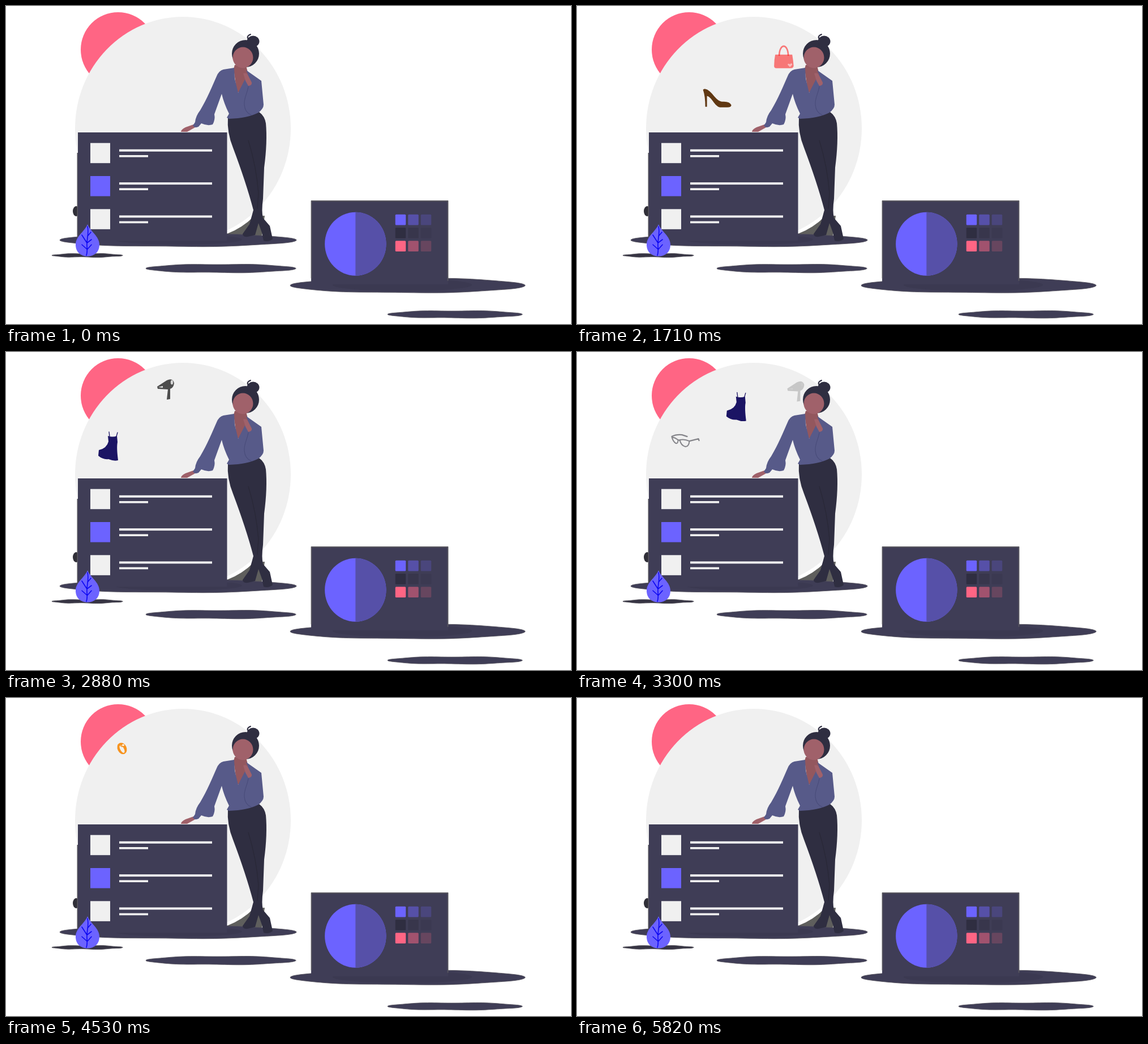
An HTML page with a canvas for the animation above (6.3 s loop, 998 by 561 pixels).

```html
<!DOCTYPE html>
<html lang="en">
<head>
<meta charset="utf-8">
<style>
html, body { margin: 0; width: 100%; height: 100%; overflow: hidden; background: #fff; }
canvas { display: block; width: 998px; height: 561px; }
</style>
</head>
<body>
<canvas id="stage" width="998" height="561"></canvas>
<script>
const ctx = document.getElementById('stage').getContext('2d');
const LOOP = 6300, STEP = 30, FADE = 240, PANEL_TOP = 223;
const SLATE = '#3f3d56', DARK = '#2f2e41', VIOLET = '#6c63ff', SKIN = '#a0616a',
      SHIRT = '#575a89', PALE = '#f0f0f0', PINK = '#ff6584', EDGE = '#58565f';

function fill(color, d) {
  ctx.fillStyle = color;
  ctx.fill(new Path2D(d), 'evenodd');
}
function line(color, width, d) {
  ctx.strokeStyle = color;
  ctx.lineWidth = width;
  ctx.lineCap = ctx.lineJoin = 'round';
  ctx.stroke(new Path2D(d));
}
function rect(color, x, y, w, h) {
  ctx.fillStyle = color;
  ctx.fillRect(x, y, w, h);
}
function oval(color, x, y, rx, ry = rx, tilt = 0, from = 0, to = 7) {
  ctx.fillStyle = color;
  ctx.beginPath();
  ctx.ellipse(x, y, rx, ry, tilt, from, Math.min(to, from + 2 * Math.PI));
  ctx.fill();
}

// Ground shadow with a slightly ragged rim.
function shadow(x0, x1, y, ry, color = SLATE) {
  const cx = (x0 + x1) / 2, rx = (x1 - x0) / 2;
  ctx.beginPath();
  for (let i = 0; i < 120; i++) {
    const a = i / 120 * 2 * Math.PI;
    const rough = Math.sin(i * 12.9) * 0.6;
    ctx.lineTo(cx + rx * Math.cos(a), y + (ry + rough) * Math.sin(a));
  }
  ctx.closePath();
  ctx.fillStyle = color;
  ctx.fill();
  ctx.strokeStyle = EDGE;
  ctx.lineWidth = 0.8;
  ctx.stroke();
}

function drawBackdrop() {
  rect('#fff', 0, 0, 998, 561);
  oval(PINK, 198, 77, 66);
  oval(PALE, 312.5, 216, 190.5, 197);
  fill('#5f5f5d', 'M390 402Q417 392 438 371L457 370L452 405H390Z');
}

function drawListPanel() {
  oval('#302f38', 124, 362, 6, 9);
  rect(EDGE, 125.5, 259, 2, 150);
  shadow(95, 513, 413, 11.5);
  oval('#3b3951', 304, 412, 113, 9);
  rect(SLATE, 127, 223, 263.5, 191);
  for (let i = 0; i < 3; i++) {
    const y = i * 58.3;
    rect(i === 1 ? VIOLET : PALE, 149, 241.7 + y, 35, 35.5);
    rect(PALE, 200, 252.8 + y, 164, 4);
    rect(PALE, 200, 263 + y, 51, 3.7);
  }
}

function drawLeaf() {
  shadow(81, 206, 440, 3.2, '#363443');
  fill(VIOLET, 'M144 385C149 398 165 406 165 421C165 434 156 441.5 144 441.5S123 434 123 421C123 406 139 398 144 385Z');
  line('#0d08f2', 1.6, 'M144 389C147 400 142 413 143 424Q144 433 142 440M144 406L150 399M143 418L134 404M143 418L151 412M143 429L134 421M143 430L151 421');
}

function drawWoman() {
  fill(DARK, 'M392 196Q390 223 401 250Q424 311 437 360L430 385L418 402Q418 408 427 407L440 404L446 383L452 400L455 414Q464 417 471 411L466 388L454 374Q451 362 454 340L456 285Q462 240 459 207Q457 194 447 187Z');
  line('#292837', 1.2, 'M428 237Q442 282 446 330L444 357');
  fill(SKIN, 'M334 208L317 214Q309 218 309 222H320L336 213Z');
  oval(DARK, 423, 84, 24);
  oval(DARK, 436.5, 62.5, 11, 10);
  line(DARK, 2, 'M429 59Q423 54 432 50');
  fill('#93575e', 'M404 104L402 111L408 153L414 151L429 125L424 105Z');
  oval(SKIN, 418.5, 91, 18, 18.5);
  fill(SHIRT, 'M403 109L384 112Q376 114 372 124C365 140 355 164 343 184Q335 194 334 205L330 211Q333 216 340 213L345 207Q356 212 365 209Q370 200 368 191L381 155Q385 172 394 190L390 197L394 199Q427 198 446 188Q455 181 455 174L451 132L424 113L427 120L410 153L404 128Z');
  fill(SKIN, 'M419 119Q424 117 427 121L434 135Q435 140 428 141L423 132Z');
  line('#4a4d7b', 1.2, 'M428 142C427 152 420 162 421 174Q422 188 433 192');
}

function drawPalettePanel() {
  shadow(502, 917, 493, 13);
  oval('#3b3951', 700, 492, 123, 11);
  rect(SLATE, 539, 343, 242, 148);
  line(EDGE, 1.8, 'M539.5 480V344H780.5V484');
  oval(VIOLET, 617.3, 419.7, 54.2, 56);
  oval('#5650a8', 617.3, 419.7, 54.2, 56, 0, -Math.PI / 2, Math.PI / 2);
  const swatches = ['#6c63ff', '#5650a8', '#4a467c', '#2f2e41', '#38364c', '#3b3951', '#ff6584', '#a1526e', '#67465f'];
  swatches.forEach((color, i) => {
    ctx.fillStyle = color;
    ctx.beginPath();
    ctx.roundRect(687.7 + i % 3 * 22.5, 367.8 + Math.floor(i / 3) * 23.2, 18.5, 18.7, 1.5);
    ctx.fill();
  });
}

// Each article is drawn around its own centre.
function sunglasses() {
  const c = '#ed1e79';
  fill(c, 'M-25 -7Q-18 -7 -12 -2L7 -1Q8 8 3 11Q-8 14 -11 3L-13 2Q-12 8 -17 8Q-24 5 -25 -7Z');
  line(c, 2.6, 'M-23 -7Q-18 -11 -7 -10L3 -6M5 1L23 -4L24 -1');
}
function bag() {
  const c = '#ff0000';
  fill(c, 'M-15 -4H15Q17 7 17.5 16Q17 20 12 20H-13Q-17 20 -17 16Q-17 5 -15 -4Z');
  line(c, 2.6, 'M-8 -3C-7 -24 7 -24 8 -3');
  fill('#fff', 'M11 18L7 14Q7 11 11 13Q15 10 15 14Z');
}
function shoe() {
  fill('#603813', 'M-25 -15Q-23 -18 -17 -15C-6 -8 -2 5 9 6Q22 5 25 12Q25 16 18 16H5C-5 14 -9 -2 -18 -4L-18 15H-21Q-21 -4 -25 -15Z');
}
function dryer() {
  const c = '#4d4d4d';
  fill(c, 'M-15 -5L2 -16Q13 -21 15 -11Q14 -3 8 -1L8 17L2 18L4 0L-14 -1Z');
  fill(PALE, 'M-13 -4L-5 -6L-5 -3Z');
  oval('#d7d7d7', 11, -12.5, 2.2, 4);
}
function dress() {
  const c = '#1b1464';
  fill(c, 'M-1 -18Q7 -15 15 -18L16 -7Q14 2 17 25Q10 27 0 23Q-10 24 -18 17L-17 7Q-3 4 0 -8Z');
  line(c, 1.3, 'M1 -25L2 -17M16 -24L14 -17');
}
function glasses() {
  const c = '#85858a';
  line(c, 2, 'M-24 -6Q-18 -5 -13 -1Q-13 6 -17 5Q-22 2 -24 -6ZM-10 -1Q-2 -3 7 1Q6 11 0 11Q-8 9 -10 -1ZM-13 -1L-10 0');
  line(c, 2.3, 'M-24 -7Q-17 -11 -6 -10L3 -7M7 1L23 -3L24 0');
}
function ring() {
  oval('#f7931e', 0, 0, 8, 10.5, -0.45);
  oval(PALE, 0, 1, 3.2, 7.5, -0.5);
  line('#f7931e', 1.4, 'M-5 -6L0 -3L4 -6');
  oval('#fff', 2, -6, 2, 1.6);
}

// Flight points: time, x, y.
const flights = [
  [sunglasses, [[120, 170, 238], [480, 196, 148], [780, 264, 85], [1050, 337, 82], [1340, 415, 89]]],
  [bag, [[720, 222, 246], [1050, 237, 134], [1440, 307, 57], [1540, 334, 54], [1830, 386, 118]]],
  [shoe, [[1410, 235, 242], [1740, 250, 156], [1980, 285, 116], [2280, 335, 151], [2460, 379, 188]]],
  [dryer, [[2070, 201, 245], [2280, 209, 187], [2580, 233, 113], [2880, 282, 66], [3090, 338, 50], [3360, 400, 76]]],
  [dress, [[2580, 168, 251], [2880, 181, 166], [3240, 266, 100], [3510, 340, 106], [3690, 384, 138], [3750, 396, 150]]],
  [glasses, [[3030, 178, 238], [3360, 197, 140], [3690, 249, 71], [3870, 297, 66], [4140, 347, 96]]],
  [ring, [[3960, 157, 235], [4200, 160, 168], [4530, 205, 89], [4740, 254, 99], [5160, 315, 213]]],
  [ring, [[4770, 254, 235], [5070, 256, 155], [5400, 271, 86], [5610, 340, 62], [5820, 409, 85]]]
];

// Cubic Hermite through unevenly timed points.
function locate(points, t) {
  let i = 0;
  while (i < points.length - 2 && t >= points[i + 1][0]) i++;
  const a = points[i], b = points[i + 1], span = b[0] - a[0];
  const slope = (n, k) => {
    const p = points[Math.max(n - 1, 0)], q = points[Math.min(n + 1, points.length - 1)];
    return (q[k] - p[k]) / (q[0] - p[0]);
  };
  const u = (t - a[0]) / span, v = 1 - u;
  return [1, 2].map(k =>
    a[k] * v * v * (1 + 2 * u) + b[k] * u * u * (3 - 2 * u) +
    span * u * v * (v * slope(i, k) - u * slope(i + 1, k)));
}

function drawFlights(t) {
  ctx.save();
  ctx.beginPath();
  ctx.rect(0, 0, 998, PANEL_TOP);
  ctx.clip();
  for (const [draw, points] of flights) {
    const end = points[points.length - 1][0];
    if (t < points[0][0] || t >= end) continue;
    ctx.save();
    ctx.globalAlpha = Math.min(1, (end - t) / FADE);
    ctx.translate(...locate(points, t));
    draw();
    ctx.restore();
  }
  ctx.restore();
}

function render(now) {
  const t = Math.floor(now % LOOP / STEP) * STEP;
  drawBackdrop();
  drawListPanel();
  drawLeaf();
  drawWoman();
  shadow(247, 512, 463, 7.5);
  drawPalettePanel();
  shadow(674, 912, 544, 6.5);
  drawFlights(t);
}

const start = performance.now();
function tick() {
  render(performance.now() - start);
  requestAnimationFrame(tick);
}
tick();
</script>
</body>
</html>
```
